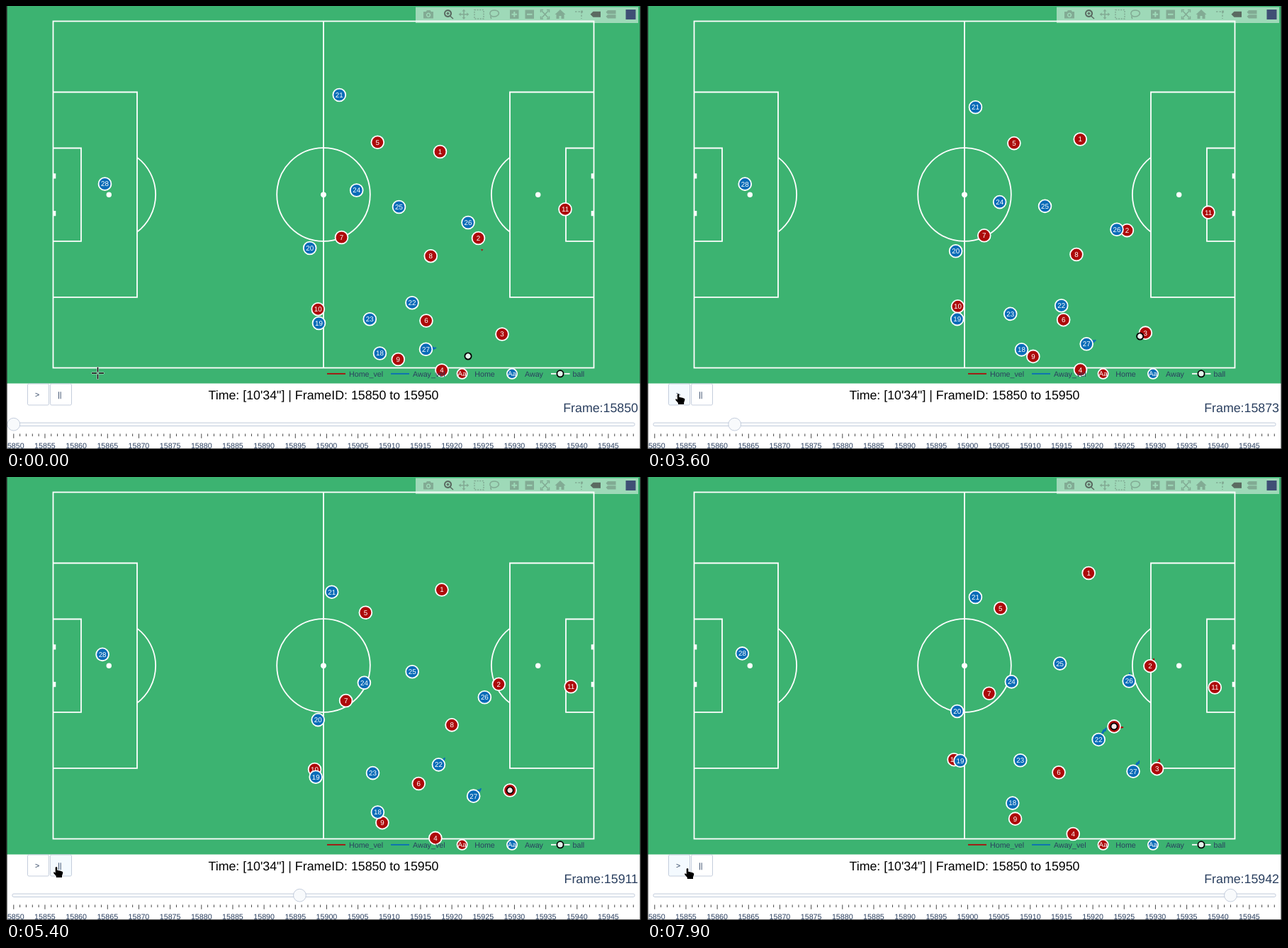
An HTML page for the animation above (8000 ms loop, 896 by 625 pixels).

```html
<!DOCTYPE html>
<html lang="en">
<head>
<meta charset="utf-8">
<title>Match replay</title>
<style>
  html, body { margin: 0; width: 100%; height: 100%; overflow: hidden; background: #fff; }
  svg { display: block; width: 100vw; height: 100vh; }
  text { font: 10.7px "Liberation Sans", Arial, sans-serif; fill: #2a3f5f; text-rendering: geometricPrecision; }
  .mid { text-anchor: middle; }
  .big { font-size: 17.8px; }
  .num { font-size: 9.8px; fill: #fff; text-anchor: middle; }
  .pitch { fill: none; stroke: #fff; stroke-width: 1.8; }
  .btn, .grip, .rail { fill: #fff; stroke: #bec8d9; stroke-width: .9; }
  .grip, .rail { fill: #f8fafc; }
  .icons { fill: #444; fill-rule: evenodd; stroke: #444; stroke-width: 0; opacity: .3; }
  .icons.on { opacity: .75; }
  .line { fill: none; stroke-width: 1.5; }
  .cursor { stroke: #fff; paint-order: stroke; stroke-linejoin: round; }
</style>
</head>
<body>
<svg viewBox="0 0 896 625" preserveAspectRatio="none">
  <rect width="896" height="625" fill="#fff"/>
  <rect width="896" height="532.5" fill="#3cb371"/>

  <g id="pitch" class="pitch">
    <rect x="66.5" y="21.5" width="763" height="489"/>
    <path d="M448 21.5V510.5"/>
    <circle cx="448" cy="266" r="65.8"/>
  </g>

  <g id="arrows"></g>
  <path id="stray" d="M670 343.3h3.4l-1.700 2.400z" fill="#ad0a0a"/>
  <g id="players"></g>
  <circle id="ball" r="4.6" fill="#fff" fill-opacity=".85" stroke="#000" stroke-width="1.8"/>

  <g stroke-width="1.8">
    <path d="M453 518.8h26" stroke="#ad0a0a"/>
    <path d="M543 518.8h26" stroke="#0a6cb8"/>
    <path d="M769 518.8h26.5" stroke="#fff"/>
    <circle cx="643.6" cy="518.8" r="7.1" fill="#ad0a0a" stroke="#fff"/>
    <circle cx="714" cy="518.8" r="7.1" fill="#0a6cb8" stroke="#fff"/>
    <circle cx="782" cy="518.8" r="4.6" fill="#e2f3ea" stroke="#000"/>
  </g>
  <text x="484" y="522.8">Home_vel</text>
  <text x="574" y="522.8">Away_vel</text>
  <text class="num" x="643.6" y="522.2">Aa</text>
  <text x="661.3" y="522.8">Home</text>
  <text class="num" x="714" y="522.2">Aa</text>
  <text x="732" y="522.8">Away</text>
  <text x="799.5" y="522.8">ball</text>

  <rect x="578" y="1.5" width="314" height="22.5" fill="#fff" opacity=".5"/>
  <g class="icons">
    <path d="M589 8h3.5l1.5-2h4.5l1.5 2h3v9.5h-14zM596 9.5a3.2 3.2 0 1 0 .1 0zM596 11a1.7 1.7 0 1 1-.1 0z"/>
    <path d="M646 4.5l2.5 3h-1.7v3.5h3.5v-1.7l3 2.5-3 2.5v-1.7h-3.5v3.5h1.7l-2.5 3-2.5-3h1.7v-3.5h-3.5v1.7l-3-2.5 3-2.5v1.7h3.5v-3.5h-1.7z"/>
    <path class="line" stroke-dasharray="2 1.6" d="M661 5.5h13v12.5h-13z"/>
    <path class="line" d="M685 14c-4-3-2-8 4-8s8 4 5 7-8 2-9 1-2 2 0 4"/>
    <path d="M711 5.5h12.5v12.5h-12.5zM716.3 8v2.8h-2.8v2h2.8v2.8h2v-2.8h2.8v-2h-2.8v-2.8z"/>
    <path d="M732.5 5.5h12.5v12.5h-12.5zM735 10.8h7.5v2h-7.5z"/>
    <path class="line" d="M754.5 9v-3.5h3.5M763 5.5h3.5v3.5M766.5 14.5v3.5h-3.5M758 18h-3.5v-3.5M756 7l9 9.500M765 7l-9 9.500"/>
    <path d="M782 5l7.5 7h-2v6h-4v-4h-3v4h-4v-6h-2z"/>
    <path class="line" stroke-dasharray="2.5 2" d="M803 8h9v10"/>
    <path d="M811 6.5h3v3h-3z"/>
    <path d="M846.5 8.8l2.5-2.8h11.5v5.2h-11.500zM846.5 14.8l2.5-2.6h11.5v5.3h-11.500z"/>
  </g>
  <g class="icons on">
    <path d="M623.5 5a5.5 5.5 0 1 0 .1 0zM623.5 7a3.5 3.5 0 1 1-.1 0z"/>
    <path class="line" d="M626.5 14l4.500 4M621.5 10.5h4M623.5 8.5v4"/>
    <path d="M824.5 11.8l4-4h10.5v8h-10.500z"/>
  </g>
  <rect x="874.5" y="5" width="14" height="14" fill="#3f4f75"/>

  <rect id="play" class="btn" x="30.5" y="533" width="30" height="30" rx="1.8"/>
  <rect id="pause" class="btn" x="62.5" y="533" width="30" height="30" rx="1.8"/>
  <text class="mid" x="44" y="551.5">&gt;</text>
  <text class="mid" x="75.7" y="551.5">||</text>
  <text class="mid big" x="448" y="555" style="fill:#000">Time: [10'34"] | FrameID: 15850 to 15950</text>
  <text id="label" class="big" x="892" y="573.3" text-anchor="end"></text>

  <rect class="rail" x="9" y="588" width="878" height="4.5" rx="1.8"/>
  <g id="ticks"></g>
  <circle id="grip" class="grip" cy="590.2" r="8.9"/>
  <path d="M0 0h1.600v625h-1.600zM894.5 0h1.500v625h-1.500zM0 624.3h896v.7h-896z" fill="#222"/>

  <g id="cursor" class="cursor">
    <path id="cross" d="M-8.5-.8h7v1.6h-7zM1.5-.8h7v1.6h-7zM-.8-8.5h1.6v7h-1.6zM-.8 1.5h1.6v7h-1.6z"/>
    <path id="arrow" d="M0 0V16L3.7 12.5L6.2 18.2L8.6 17.2L6.2 11.6H11.3Z"/>
    <path id="hand" d="M-1.3 1Q0-.8 1.3 1V4.8L3.5 5.2L6 5.8L8.5 6.8Q9.5 7.4 9.2 9L8 12.500V15H-.2V13L-3.6 9.2Q-4.6 7.4-3 7.3L-1.3 8.5Z"/>
  </g>
</svg>

<script>
const LOOP = 8000, FIRST = 15850, LAST = 92, RAIL = 10.8, STEP = 8.833;
const RED = '#ad0a0a', BLUE = '#0a6cb8';
const $ = id => document.getElementById(id);
const clamp = u => Math.min(1, Math.max(0, u));
const smooth = u => u * u * (3 - 2 * u);
const mix = (a, b, u) => a.map((v, i) => v + (b[i] - v) * u);
const move = (el, [x, y]) => el.setAttribute('transform', `translate(${x} ${y})`);
const show = (el, on) => el.setAttribute('visibility', on ? 'visible' : 'hidden');

function add(parent, tag, attrs, text) {
  const el = document.createElementNS('http://www.w3.org/2000/svg', tag);
  for (const k in attrs) el.setAttribute(k, attrs[k]);
  if (text !== undefined) el.textContent = text;
  parent.appendChild(el);
  return el;
}

// Both halves of the pitch mirror each other about x = 448.
function drawHalf(side) {
  const g = add($('pitch'), 'g', { transform: `translate(448 266.2) scale(${side} 1)` });
  add(g, 'path', { d: 'M381.5-144.700H263V144.700H381.5M381.5-65.700H342V65.700H381.5M263-52.600A66 66 0 0 0 263 52.600' });
  add(g, 'path', { d: 'M377.700-30h4.300v7.300h-4.300zM377.700 22.700h4.300v7.300h-4.300z', fill: '#fff', stroke: 'none' });
  for (const cx of [0, 302.7]) add(g, 'circle', { cx, r: 3.7, fill: '#fff', stroke: 'none' });
}
drawHalf(-1);
drawHalf(1);

for (let i = 0; i < 100; i++) {
  const x = RAIL + i * STEP, major = i % 5 === 0;
  add($('ticks'), 'path', { d: `M${x} 603.5v${major ? 6.3 : 3.6}`, stroke: '#333', 'stroke-width': .9 });
  if (major) add($('ticks'), 'text', { class: 'mid', x, y: 624 }, FIRST + i);
}

// Start, travel and, where the run curves more than usual, its bend (y, x).
const home = [
  [612.5, 205.5, 10, -68.5, 0, -5],
  [666.5, 327.5, 42.5, -59, 5.5],
  [700, 463, 19, -49, 14, -2],
  [615, 514, -13.5, -10],
  [524.3, 192.3, -25, -6.5],
  [593, 444, -12, -26, 7, -3],
  [473.5, 326.5, 9, -20.5],
  [599.3, 352.7, 57.5, -1, -2.5, -10.5],
  [553.3, 498.5, -33, -16, 0],
  [440.3, 427.7, -7, -28],
  [789, 286.7, 12, 10.3]
];
const away = [
  [527.5, 490, -11, -29, 3, 5],
  [441.5, 447.5, 0, -45.5, 7.5, -5],
  [428.7, 341.5, 9.3, -10, 9, 6],
  [470.3, 125.5, -7.3, 43.8, 8, -6.5],
  [573, 418.7, 62.3, -45.4, 20.5, -5.5],
  [513.3, 441.7, 12.7, -40.7, 4, -5],
  [494.7, 260, 19, 29.3, 12, -2.5],
  [554.5, 283.5, 27.5, -19.5],
  [652, 305.5, 28, -15.5, 18, 5],
  [592.5, 484.3, 92, -66.5, 12.5, 5.5],
  [139.5, 251, -5, -2]
];

// A run is a straight line plus a parabola that peaks halfway.
function spot([x, y, dx, dy, by = .15 * Math.hypot(dx, dy), bx = 0], s) {
  const u = s / 90, arc = 4 * u * (1 - u);
  return [x + dx * u + bx * arc, y + dy * u + by * arc];
}

function makePlayer(run, number, color) {
  const arrow = add($('arrows'), 'path', { stroke: color, fill: color, 'stroke-width': 1.8, 'stroke-linejoin': 'round' });
  const disc = add($('players'), 'g', {});
  add(disc, 'circle', { r: 8.9, fill: color, stroke: '#fff', 'stroke-width': 1.8 });
  add(disc, 'text', { class: 'num', y: 3.4 }, number);
  return { run, arrow, disc };
}
const players = [
  ...home.map((run, i) => makePlayer(run, i + 1, RED)),
  ...away.map((run, i) => makePlayer(run, i + 18, BLUE))
];

// The arrow leads a player by about 11 steps; slow ones stay under the disc.
function arrowPath(run, s) {
  const [x, y] = spot(run, s), a = spot(run, s - 5.5), b = spot(run, s + 5.5);
  const dx = b[0] - a[0], dy = b[1] - a[1], len = Math.hypot(dx, dy);
  if (len < 10.5) return '';
  const ux = dx / len, uy = dy / len, tx = x + dx, ty = y + dy;
  const bx = tx - 3.6 * ux, by = ty - 3.6 * uy;
  return `M${x} ${y}L${tx} ${ty}L${bx - uy * 1.4} ${by + ux * 1.4}L${bx + uy * 1.4} ${by - ux * 1.4}Z`;
}

// Player 3 receives the ball, carries it and passes to player 8.
function ballSpot(s) {
  const three = spot(home[2], Math.min(s, 64));
  return s < 64
    ? mix([652, 494], three, clamp(s / 27))
    : mix(three, spot(home[7], s), clamp((s - 64) / 20));
}

// Playback picks up speed, then runs at 22 steps per second.
function playhead(t) {
  const v = Math.max(0, t - 2200) / 1000;
  return Math.min(LAST, Math.round(22 * v - 9 * (1 - Math.exp(-1.6 * v))));
}

// The slider trails the playhead and catches up after the pause.
function gripStep(t) {
  const s = playhead(t);
  const lag = s * (.46 - .26 * smooth(clamp((s - 13) / 67)));
  return s - lag * (1 - clamp((t - 6800) / 300));
}

// The screen refreshes every 100 ms, stalls once, and later every 200 ms.
function refresh(t) {
  if (t < 3100) return Math.min(t, 2400);
  return t < 5700 ? t : 5500 + Math.floor((t - 5500) / 200) * 200;
}

const mouse = [
  [300, 129.5, 518], [700, 172, 550], [1000, 142, 577], [1200, 102, 549], [1700, 43.5, 547],
  [4800, 44.5, 547], [5400, 71, 550], [5600, 88.5, 550], [7700, 88.5, 550], [7900, 57, 552]
];

function mouseSpot(t) {
  const i = mouse.findIndex(m => m[0] > t);
  if (i < 1) return mouse[i < 0 ? mouse.length - 1 : 0].slice(1);
  const a = mouse[i - 1], b = mouse[i];
  return mix(a, b, (t - a[0]) / (b[0] - a[0])).slice(1);
}

function drawCursor(t) {
  const [x, y] = mouseSpot(t);
  const over = left => y > 533 && y < 563 && x > left && x < left + 30;
  const onPlay = over(30.5), onPause = over(62.5), cross = y < 532;
  move($('cursor'), [x, y]);
  show($('cross'), cross);
  show($('hand'), onPlay || onPause);
  show($('arrow'), !cross && !onPlay && !onPause);
  $('play').style.fill = onPlay ? '#f4faff' : '#fff';
  $('pause').style.fill = onPause ? '#f4faff' : '#fff';
}

function render(ms) {
  const tick = Math.floor((ms % LOOP) / 100) * 100;
  const t = refresh(tick), s = playhead(t);
  for (const { run, arrow, disc } of players) {
    move(disc, spot(run, s));
    arrow.setAttribute('d', arrowPath(run, s));
  }
  move($('ball'), ballSpot(s));
  show($('stray'), s === 0);
  $('label').textContent = 'Frame:' + (FIRST + s);
  $('grip').setAttribute('cx', RAIL + STEP * gripStep(t));
  drawCursor(tick);
}

const start = performance.now();
function loop() {
  render(performance.now() - start);
  requestAnimationFrame(loop);
}
loop();
</script>
</body>
</html>
```
